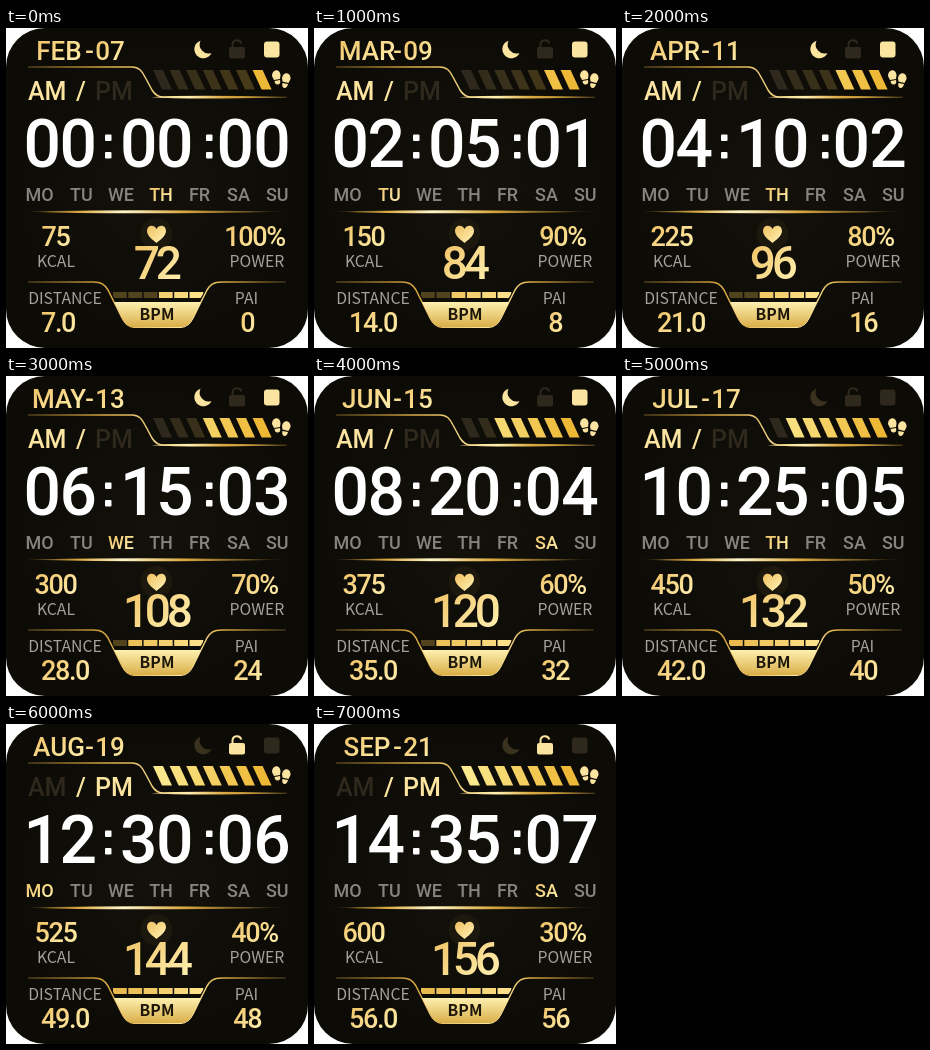
An HTML page that plays this animation: 302x320 px, repeating every 8 s.

```html
<!DOCTYPE html>
<html lang="en">
<head>
<meta charset="utf-8">
<title>Watch face</title>
<style>
html, body { margin: 0; width: 100%; height: 100%; overflow: hidden; background: #fff; }
svg { display: block; width: 302px; height: 320px; }
text { font-family: Roboto, sans-serif; text-anchor: middle; }
.gold { fill: url(#gold); }
.label { font: 15.8px "Noto Sans CJK SC", "Noto Sans CJK JP", "Noto Sans", sans-serif; fill: #a3a29d; }
.head { font-size: 26px; font-weight: 500; }
.half { font-size: 25px; font-weight: 500; }
.value { font-size: 27px; font-weight: 450; letter-spacing: -1.4px; }
.pulse { font-size: 46px; font-weight: 450; letter-spacing: -4.2px; }
.day { font-size: 18px; font-weight: 500; }
.digit { font-size: 66px; font-weight: 500; fill: #fff; }
</style>
</head>
<body>
<svg viewBox="0 0 302 320">
  <defs>
    <linearGradient id="gold" x2="1" y2="1">
      <stop offset=".1" stop-color="#f1c468"/><stop offset=".8" stop-color="#fdeaa6"/>
    </linearGradient>
    <linearGradient id="rule" gradientUnits="userSpaceOnUse" x1="20" x2="283">
      <stop stop-color="#d9a840" stop-opacity=".3"/><stop offset=".3" stop-color="#d9a840"/>
      <stop offset=".62" stop-color="#fff0b0"/><stop offset=".75" stop-color="#d9a840"/>
      <stop offset="1" stop-color="#d9a840" stop-opacity=".2"/>
    </linearGradient>
    <linearGradient id="divider">
      <stop stop-color="#d9a840" stop-opacity=".15"/><stop offset=".2" stop-color="#d9a840"/>
      <stop offset=".37" stop-color="#fff6cc"/><stop offset=".6" stop-color="#d9a840"/>
      <stop offset="1" stop-color="#d9a840" stop-opacity=".1"/>
    </linearGradient>
    <linearGradient id="cup" x2="0" y2="1">
      <stop stop-color="#fdf0b0"/><stop offset="1" stop-color="#d9ae48"/>
    </linearGradient>
    <radialGradient id="bg">
      <stop stop-color="#13110a"/><stop offset="1" stop-color="#0d0b06"/>
    </radialGradient>
    <clipPath id="cupTop"><path d="M104 263H199L194 271H109Z"/></clipPath>
  </defs>
  <rect width="302" height="320" rx="39" fill="url(#bg)"/>

  <g fill="none" stroke="url(#rule)" stroke-width="1.5">
    <path d="M22 39H126C133 39 136 43 139 49L146 62C149 67 152 69.200 158 69.200H281"/>
    <path d="M22 254H87C96 254 99 257 102 262L116 290C119 296 122 299.200 128 299.200H175C181 299.200 184 296 187 290L201 262C204 257 207 254 216 254H280"/>
  </g>
  <path d="M145 69.200Q185 66.500 281 69.200Q185 72 145 69.200Z" fill="url(#rule)"/>
  <path d="M20 183.700Q115 180.700 283 183.700Q115 186.700 20 183.700Z" fill="url(#divider)"/>
  <path d="M108 274H195L187 290C184 296 181 299 175 299H128C122 299 119 296 116 290Z" fill="url(#cup)"/>
  <circle cx="150.500" cy="206" r="16" fill="#1c180e"/>
  <path class="gold" d="M150.500 215C147 212 141 208 141 203C141 197 148 196 150.500 201C153 196 160 197 160 203C160 208 154 212 150.500 215Z"/>

  <path id="moon" d="M194.500 12.700A9 9 0 1 0 205.500 25A9 9 0 0 1 194.500 12.700Z"/>
  <g id="lock">
    <rect x="223" y="19" width="16" height="11.500" rx="2" stroke="none"/>
    <path d="M226.500 20V16.500A4.500 4.500 0 0 1 235.300 15.500" fill="none" stroke-width="2"/>
  </g>
  <rect id="link" x="258" y="13.500" width="15.500" height="16" rx="3"/>

  <g fill="#fbe3a0">
    <path d="M266 48C266 41 274 40 274.500 47L274 51L268 52Z"/>
    <path d="M268.500 53L274 52Q275 56 272 56.500Q269 57 268.500 53Z"/>
    <path d="M276 50C277 43 285 44 284.500 51L282.500 55L276.500 53.500Z"/>
    <path d="M276.500 55L282 56Q281 60.500 278 60Q275.500 59 276.500 55Z"/>
  </g>
  <g id="stripes"></g>
  <g id="segs" clip-path="url(#cupTop)"></g>
  <g fill="#fff" id="dots"></g>
  <g id="words"></g>
</svg>
<script>
const $ = id => document.getElementById(id);
const DIM = "#2e291c", GOLD = "url(#gold)", PALE = "#fbe3a0", GREY = "#85847f";

function add(parent, tag, attrs, content = "") {
  const el = document.createElementNS("http://www.w3.org/2000/svg", tag);
  for (const key in attrs) el.setAttribute(key, attrs[key]);
  el.textContent = content;
  return $(parent).appendChild(el);
}
const word = (x, y, cls, content, style = "") =>
  add("words", "text", { x, y, class: cls, style }, content);
const paint = (el, fill) => el.setAttribute("fill", fill);
const pad = n => String(n).padStart(2, "0");
const mix = (a, b, k) => `rgb(${a.map((v, i) => Math.round(v + (b[i] - v) * k))})`;

const months = ["FEB", "MAR", "APR", "MAY", "JUN", "JUL", "AUG", "SEP"];
const days = ["MO", "TU", "WE", "TH", "FR", "SA", "SU"];
const dayAt = [3, 1, 3, 2, 5, 3, 0, 5];

word(50, 238.7, "label", "KCAL");
word(251, 238.7, "label", "POWER");
word(59, 275.6, "label", "DISTANCE");
word(240.5, 275.6, "label", "PAI");
word(151, 292, "label", "BPM", "fill:#1d170a;font-weight:700");

const month = word(53, 32, "head gold");
word(83.5, 32, "head", "-").setAttribute("fill", "#f8dc90");
const date = word(104, 32, "head gold");
const half = [[41.2, "AM"], [75, "/"], [108, "PM"]].map(([x, s]) => word(x, 72, "half", s));
const digits = [36.3, 72.2, 132.7, 168.8, 229.3, 266].map(x => word(x, 139, "digit"));
const week = [33.7, 75.3, 115, 155, 193.5, 232.5, 271.2].map((x, i) =>
  word(x, 173, "day", days[i]));
const kcal = word(49.5, 218, "value gold");
const power = word(248.5, 218, "value gold");
const dist = word(35, 303.5, "value gold", "", "text-anchor:start");
const pai = word(241.3, 303.5, "value gold");
const pulse = word(149.8, 251, "pulse gold");
paint(half[1], PALE);

for (const x of [99, 200])
  for (const y of [106.5, 124]) add("dots", "rect", { x, y, width: 6.5, height: 6.5, rx: 1 });

const stripes = Array.from({ length: 7 }, (_, i) =>
  add("stripes", "path", { d: `M${147 + i * 16.6} 42h10l9 19.500h-10Z` }));
const segs = Array.from({ length: 6 }, (_, i) =>
  add("segs", "rect", { x: 107 + i * 15.3, y: 264, width: 13.8, height: 6 }));

function show(n) {
  const hour = n * 2, bpm = 72 + n * 12;
  month.textContent = months[n];
  date.textContent = pad(7 + n * 2);
  const clock = pad(hour) + pad(n * 5) + pad(n);
  digits.forEach((el, i) => el.textContent = clock[i]);
  paint(half[0], hour < 12 ? PALE : DIM);
  paint(half[2], hour < 12 ? DIM : PALE);
  week.forEach((el, i) => paint(el, i === dayAt[n] ? GOLD : GREY));

  kcal.textContent = 75 * (n + 1);
  power.textContent = 100 - n * 10 + "%";
  dist.textContent = (7 * (n + 1)).toFixed(1);
  pai.textContent = n * 8;
  pulse.textContent = bpm;

  stripes.forEach((el, i) => paint(el, i >= 6 - n
    ? mix([250, 232, 140], [238, 184, 55], i / 6)
    : mix([46, 41, 28], [76, 61, 24], i / 6)));
  const lit = Math.min(6, Math.ceil(bpm / 24));
  segs.forEach((el, i) => paint(el, i >= 6 - lit
    ? mix([232, 185, 78], [253, 224, 135], i / 5) : "#51431d"));

  const linked = n < 5, lock = n > 5 ? PALE : DIM;
  paint($("moon"), linked ? PALE : "#3a321f");
  paint($("link"), linked ? PALE : DIM);
  paint($("lock"), lock);
  $("lock").setAttribute("stroke", lock);
}

const start = performance.now();
let last = -1;
function tick(now) {
  const n = Math.floor(Math.max(0, now - start) % 8000 / 1000);
  if (n !== last) show(last = n);
  requestAnimationFrame(tick);
}
tick(start);
</script>
</body>
</html>
```
